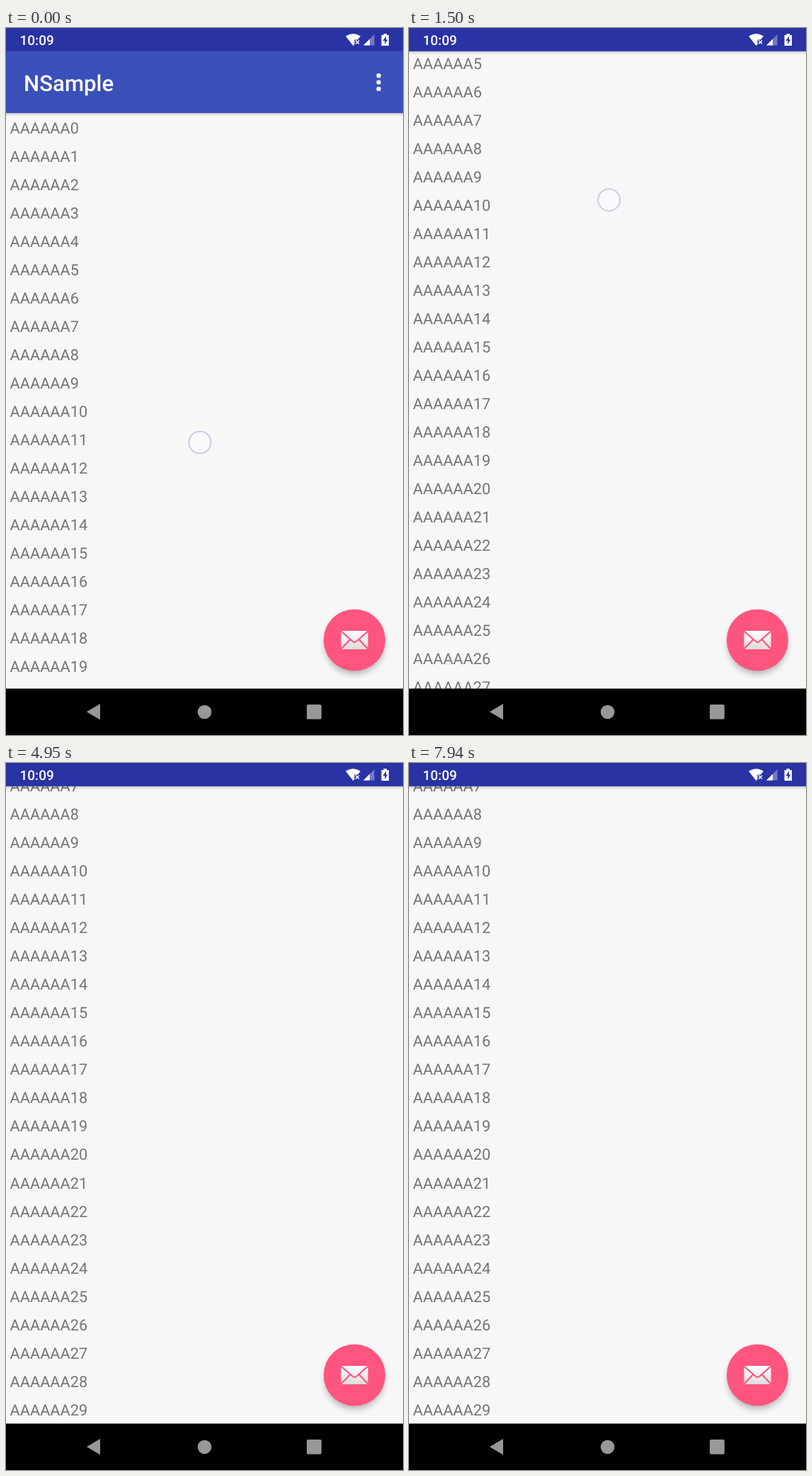
Recreate the animation shown at these times as an HTML page. Size 561 by 998 pixels, loop 8000 ms.

```html
<!DOCTYPE html>
<html lang="en">
<head>
<meta charset="utf-8">
<title>NSample</title>
<style>
  html, body { margin: 0; width: 100%; height: 100%; overflow: hidden; background: #000; }
  svg { display: block; width: 561px; height: 998px; font-family: Roboto, sans-serif; text-rendering: geometricPrecision; }
  #rows { font-size: 21.82px; fill: #757575; }
</style>
</head>
<body>
<svg viewBox="0 0 561 998">
  <defs>
    <linearGradient id="paper" x1="0" y1="0" x2="0" y2="1">
      <stop offset="0" stop-color="#fff"/>
      <stop offset="1" stop-color="#dcdcdc"/>
    </linearGradient>
    <linearGradient id="edge" x1="0" y1="0" x2="0" y2="1">
      <stop offset="0" stop-color="#000" stop-opacity=".18"/>
      <stop offset="1" stop-color="#000" stop-opacity="0"/>
    </linearGradient>
    <filter id="soft" x="-30%" y="-30%" width="160%" height="160%">
      <feGaussianBlur stdDeviation="5"/>
    </filter>
  </defs>

  <rect width="561" height="998" fill="#f7f7f8"/>
  <g id="rows"></g>

  <g id="bar">
    <rect y="120" width="561" height="5" fill="url(#edge)"/>
    <rect y="20" width="561" height="100" fill="#3a4fb8"/>
    <text x="25" y="88.5" font-size="31.2" font-weight="500" fill="#fff">NSample</text>
    <path d="M526.6 67.3v0m0 9.300v0m0 9.300v0" stroke="#fff" stroke-width="6.400" stroke-linecap="round"/>
  </g>

  <!-- status bar -->
  <rect width="561" height="32.7" fill="#2933a4"/>
  <g fill="#fff">
    <text x="19.5" y="23.8" font-size="19" font-weight="500">10:09</text>
    <path d="M480 11.5Q490.5 4.5 501 11.5L497 16.5H492.5V23L490.5 25Z"/>
    <path d="M494 17.5l5 5m0-5l-5 5" stroke="#fff" stroke-width="1.5"/>
    <path d="M505 24.5L520.5 9V24.5Z" opacity=".35"/>
    <path d="M505 24.5L514 15.5V24.5Z"/>
    <path d="M530.5 10h3V8h4.500v2h3V25h-10.500Z"/>
  </g>
  <path d="M537 11.5L532.5 18h2.800v5l4-6.500H537Z" fill="#2933a4"/>

  <!-- mail button -->
  <circle cx="492.4" cy="870" r="42" opacity=".28" filter="url(#soft)"/>
  <circle cx="492.4" cy="864" r="43.6" fill="#ff557f"/>
  <rect x="473.5" y="851" width="38" height="26" rx="1" fill="url(#paper)"/>
  <path d="M473.5 851.5L490 866q2.500 2 5 0L511.5 851.5M473.5 876.5l12.500-13M511.5 876.5l-12.500-13"
        fill="none" stroke="#ff557f" stroke-width="2.2"/>

  <!-- navigation -->
  <rect y="932.5" width="561" height="66"/>
  <g fill="#989898">
    <path d="M114 965.2L133 954V976.5Z"/>
    <circle cx="280.6" cy="965.5" r="9.8"/>
    <rect x="425" y="955" width="20.8" height="20.8" rx="2"/>
  </g>

  <circle id="finger" r="15.5" fill="#fafafc" fill-opacity=".85" stroke="#cccde4" stroke-width="2"/>
</svg>
<script>
const LOOP = 8000, STEP = 150, SKIP = 5990;
const ROW = 40.01, COUNT = 30;
const BAR = 87.3, LIST = 300.9;  // how far the bar and the list can move
const REST = 200, SLOP = 52;     // a finger rests, then drags this far before anything follows

const swipes = [
  { start: 0, end: 1700, from: [274, 585], to: [284, 190] },
  { start: 1900, end: 2550, from: [287, 440], to: [293, 229] },
  { start: 3000, end: 3900, from: [284, 640], to: [290, 384] },
  { start: 4100, end: 4800, from: [284, 640], to: [290, 400] },
  { start: 5100, end: 5900, from: [291, 535], to: [295, 694] },
  { start: 6590, end: 7640, from: [284, 620], to: [292, 340] }
];

const $ = id => document.getElementById(id);
const clamp = (v, max) => Math.min(Math.max(v, 0), max);
const shift = (id, x, y) => $(id).setAttribute("transform", `translate(${x} ${y})`);

function fingerAt(s, t) {
  const p = clamp((t - s.start - REST) / (s.end - s.start - REST), 1);
  return s.from.map((v, i) => v + (s.to[i] - v) * p);
}

// every drag moves the bar first, and the list takes what is left
function scrollAt(t) {
  let bar = 0, list = 0;
  for (const s of swipes) {
    const way = s.from[1] - fingerAt(s, t)[1];
    const drag = Math.sign(way) * Math.max(Math.abs(way) - SLOP, 0);
    const moved = clamp(bar + drag, BAR);
    list = clamp(list + drag - (moved - bar), LIST);
    bar = moved;
  }
  return { bar, list };
}

for (let i = 0; i < COUNT; i++) {
  const row = document.createElementNS("http://www.w3.org/2000/svg", "text");
  row.textContent = "AAAAAA" + i;
  row.setAttribute("x", 5.45);
  row.setAttribute("y", 148.5 + i * ROW);
  $("rows").append(row);
}

function draw(ms) {
  // the screen refreshes in steps, counted anew from SKIP
  const base = ms < SKIP ? 0 : SKIP;
  const t = base + Math.floor((ms - base) / STEP) * STEP;

  const { bar, list } = scrollAt(t);
  shift("bar", 0, -bar);
  shift("rows", 0, -bar - list);

  const swipe = swipes.find(s => t >= s.start && t <= s.end);
  $("finger").style.display = swipe ? "" : "none";
  if (swipe) shift("finger", ...fingerAt(swipe, t));
}

const begin = performance.now();
function tick() {
  draw((performance.now() - begin) % LOOP);
  requestAnimationFrame(tick);
}
tick();
</script>
</body>
</html>
```
